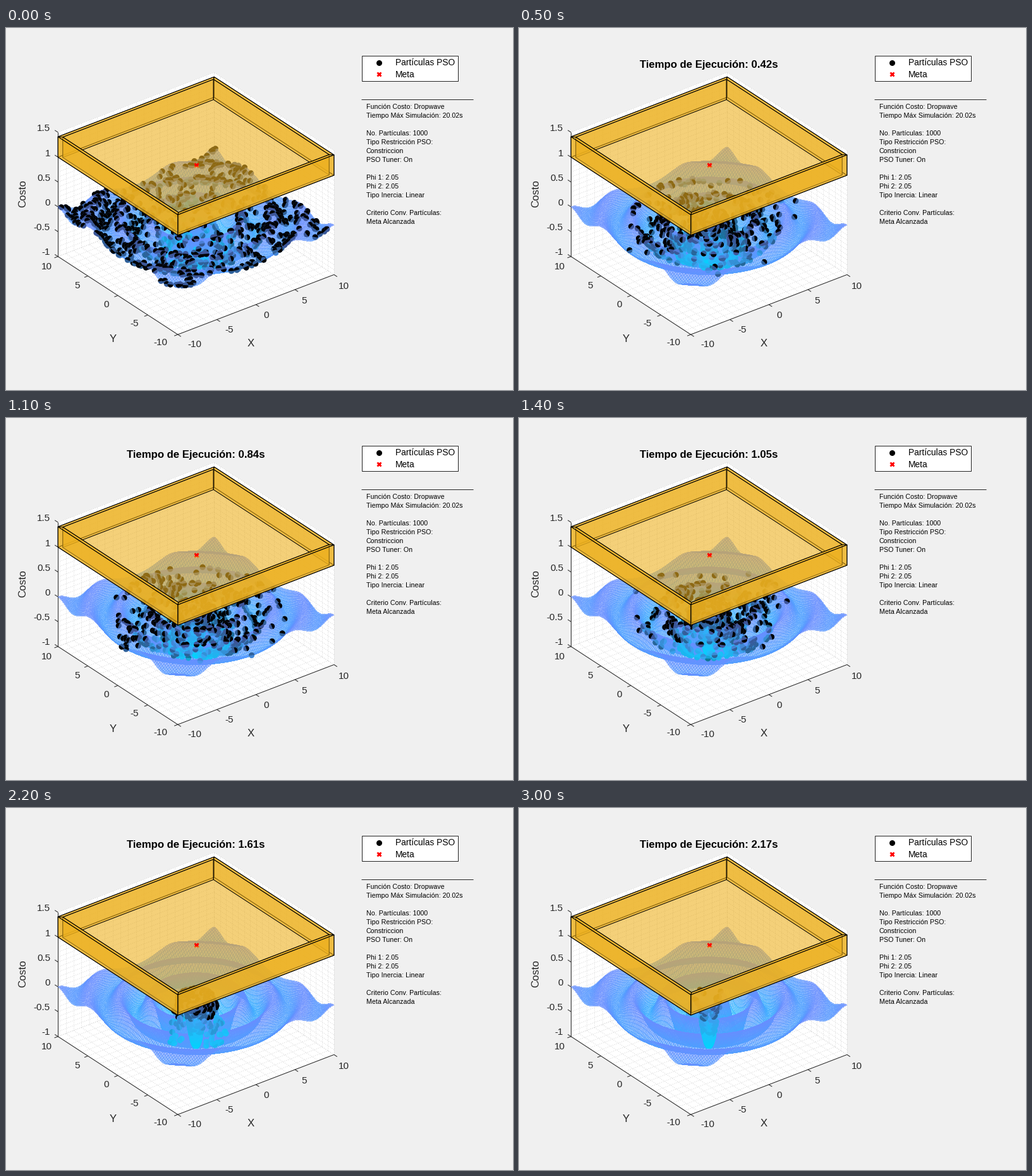
A matplotlib script that plays this animation: 802x573 px, repeating every 3.1 s.

```python
import numpy as np
import matplotlib.pyplot as plt
from matplotlib.animation import FuncAnimation
from matplotlib.collections import LineCollection, PolyCollection
from matplotlib.patches import Polygon, Rectangle

W, H, DPI = 802, 573, 100
FRAMES, STEP_MS = 31, 100
PX = 72 / DPI                       # points per pixel

# Orthographic view: azimuth -37.5, elevation 30
AZ, EL = np.radians(37.5), np.radians(30)
S, SZ = 15.57, 90.8                 # pixels per unit in x/y and in z
RIGHT = np.array([np.cos(AZ), -np.sin(AZ), 0])
UP = np.array([np.sin(EL) * np.sin(AZ), np.sin(EL) * np.cos(AZ), np.cos(EL)])
EYE = np.array([-np.cos(EL) * np.sin(AZ), -np.cos(EL) * np.cos(AZ), np.sin(EL)])
CX, CY = 300.5, 297.4               # screen place of the point (0, 0, 0)

ORANGE = (237 / 255, 177 / 255, 32 / 255, 0.6)
INK = '0.15'
ALPHA = 0.6                         # opacity of the cost surface


def cost(x, y):
    r = np.hypot(x, y)
    return -(1 + np.cos(2 * r)) / (0.068 * r**2 + 2)


def project(x, y, z):
    p = np.stack(np.broadcast_arrays(S * x, S * y, SZ * z), axis=-1)
    return np.stack([CX + p @ RIGHT, CY - p @ UP], axis=-1)


def surface_rgb(z):
    low, high = np.array([0, 215, 255]), np.array([104, 142, 255])
    t = np.clip(1 + np.asarray(z), 0, 1)[..., None]
    return (low + (high - low) * t) / 255


fig = plt.figure(figsize=(W / DPI, H / DPI), dpi=DPI, facecolor='#f0f0f0')
ax = fig.add_axes([0, 0, 1, 1])
ax.set_xlim(0, W)
ax.set_ylim(H, 0)
ax.axis('off')


def label(x, y, s, size, ha='center', color=INK, **kw):
    """Text whose capitals are centred on y."""
    return ax.text(x, y + 0.36 * size, s, fontsize=size * PX, ha=ha,
                   va='baseline', color=color, family='Liberation Sans',
                   zorder=9, **kw)


def lines(segs, color, zorder, style='solid'):
    ax.add_collection(LineCollection(segs, colors=color, linewidths=PX,
                                     linestyles=[style], zorder=zorder))


def draw_axes():
    hull = [(-10, -10, -1), (10, -10, -1), (10, -10, 1.5), (10, 10, 1.5),
            (-10, 10, 1.5), (-10, 10, -1)]
    ax.add_patch(Polygon([project(*p) for p in hull], fc='white', lw=0, zorder=0))

    grid = []
    for u in range(-10, 11):
        grid += [[(u, -10, -1), (u, 10, -1)], [(-10, u, -1), (10, u, -1)],
                 [(u, 10, -1), (u, 10, 1.5)], [(10, u, -1), (10, u, 1.5)]]
    for z in np.linspace(-1, 1.5, 26):
        grid += [[(-10, 10, z), (10, 10, z)], [(10, -10, z), (10, 10, z)]]
    lines([[project(*a), project(*b)] for a, b in grid], '0.84', 1, (0, (1, 2)))

    corner = project(-10, -10, -1)
    left, right = project(-10, 10, -1), project(10, -10, -1)
    axes = [[corner, left], [corner, right], [left, project(-10, 10, 1.5)]]
    for i, v in enumerate(range(-10, 11, 5)):
        a, b = project(v, -10, -1), project(-10, v, -1)
        axes += [[a, a + (5, 3.2)], [b, b + (-5.6, 2.1)]]
        label(298 + 54.2 * i + 1.2 * i * i, 500 - 23 * i, str(v), 15.2)
        label(244 - 40 * i - 1.25 * i * i, 497 - 30 * i, str(v), 15.2)
    for i, v in enumerate(np.arange(-1, 1.6, 0.5)):
        a = project(-10, 10, v)
        axes.append([a, a + (-5, -3.2)])
        label(70, 354 - 39.2 * i, f'{v:g}', 15.2, ha='right')
    lines(axes, INK, 2)

    label(387, 498, 'X', 16.7)
    label(169, 491, 'Y', 16.7)
    ax.text(27, 262, 'Costo', fontsize=16.7 * PX, rotation=90, color=INK,
            ha='center', va='center', family='Liberation Sans', zorder=9)


def draw_surface(cells=96):
    g = np.linspace(-10, 10, cells + 1)
    x, y = np.meshgrid(g, g)
    z = cost(x, y)
    p = project(x, y, z)
    quads = np.stack([p[:-1, :-1], p[:-1, 1:], p[1:, 1:], p[1:, :-1]], axis=2)
    mid = (g[1:] + g[:-1]) / 2
    mx, my = np.meshgrid(mid, mid)
    order = np.argsort((EYE[0] * mx + EYE[1] * my).ravel())
    rgb = surface_rgb(cost(mx, my)).reshape(-1, 3)
    rgba = np.column_stack([rgb, np.full(len(rgb), ALPHA)])
    ax.add_collection(PolyCollection(quads.reshape(-1, 4, 2)[order], linewidths=0,
                                     facecolors=rgba[order], antialiaseds=False,
                                     zorder=3))


def draw_tray(low=1.0, high=1.41, wall=0.35):
    o, i = 10, 10 - wall
    flat = [(-1, -1), (1, -1), (1, 1), (-1, 1)]

    def side(a, b, r):
        return [(a[0] * r, a[1] * r, low), (b[0] * r, b[1] * r, low),
                (b[0] * r, b[1] * r, high), (a[0] * r, a[1] * r, high)]

    def rim(a, b):
        return [(a[0] * o, a[1] * o, high), (b[0] * o, b[1] * o, high),
                (b[0] * i, b[1] * i, high), (a[0] * i, a[1] * i, high)]

    front, right, back, left = flat
    far = [(left, back), (right, back)]
    near = [(front, left), (front, right)]
    faces = [[(a * o, b * o, low) for a, b in flat]]
    faces += [side(a, b, o) for a, b in far] + [side(a, b, i) for a, b in far]
    faces += [side(a, b, i) for a, b in near]
    faces += [rim(a, b) for a, b in far + near]
    faces += [side(a, b, o) for a, b in near]
    for f in faces:
        ax.add_patch(Polygon([project(*p) for p in f], fc=ORANGE, ec='black',
                             lw=PX, joinstyle='round', zorder=6))


def cross(x, y, zorder):
    return ax.plot([x], [y], 'x', color='red', ms=6.4 * PX, mew=2.8 * PX,
                   zorder=zorder)[0]


def draw_goal():
    # The lower half of the mark lies behind the tray's floor.
    cross(300.5, 217, 5)
    top = cross(300.5, 217, 7)
    top.set_clip_path(Rectangle((290, 205), 21, 12.5, transform=ax.transData))


def draw_panel():
    ax.add_patch(Rectangle((562.5, 43.5), 152, 40, fc='white', ec=INK, lw=PX,
                           zorder=8))
    ax.plot([589.5], [54.5], 'o', color='black', ms=9 * PX, mew=0, zorder=9)
    cross(589.5, 73, 9)
    label(616, 54.5, 'Partículas PSO', 13.75, ha='left', color='black')
    label(616, 73.5, 'Meta', 13.75, ha='left', color='black')

    lines([[(562, 112.5), (739, 112.5)]], INK, 8)
    info = ['Función Costo: Dropwave', 'Tiempo Máx Simulación: 20.02s', '',
            'No. Partículas: 1000', 'Tipo Restricción PSO:', 'Constriccion',
            'PSO Tuner: On', '', 'Phi 1: 2.05', 'Phi 2: 2.05',
            'Tipo Inercia: Linear', '', 'Criterio Conv. Partículas:',
            'Meta Alcanzada']
    for i, s in enumerate(info):
        label(570, 124.5 + 14 * i, s, 10.67, ha='left', color='black')


def swarm_path(count=1000, chi=0.7298, phi=2.05):
    """Constricted swarm around the best point, held to the wanted spread."""
    rng = np.random.default_rng(12)
    x = rng.uniform(-10, 10, (count, 2))
    v, best = np.zeros_like(x), x.copy()
    keys = [0, 5, 9, 14, 18, 22, 30]
    spread = [5, 2.7, 3.5, 2.1, 1.2, 0.62, 0.14]
    reach = [10, 10.5, 10.8, 9, 6, 3.4, 1.8]
    path = [x]
    for n in range(1, FRAMES):
        r1, r2 = rng.random((2, count, 2))
        v = chi * (v + phi * r1 * (best - x) - phi * r2 * x)
        x = x + v
        better = cost(*x.T) < cost(*best.T)
        best = np.where(better[:, None], x, best)
        q = x * np.interp(n, keys, spread) / np.abs(x).mean()
        r = np.hypot(*q.T)[:, None]
        limit = np.interp(n, keys, reach)
        path.append(np.clip(q / np.sqrt(1 + (r / limit)**2), -10, 10))
    return path


def layers_before(x, y, z):
    """Number of surface sheets between each point and the eye."""
    t = np.arange(8, 200, 4)
    qx, qy = x[:, None] + t * EYE[0] / S, y[:, None] + t * EYE[1] / S
    gap = z[:, None] + t * EYE[2] / SZ - cost(qx, qy)
    inside = (np.abs(qx) <= 10) & (np.abs(qy) <= 10)
    return ((gap[:, 1:] * gap[:, :-1] < 0) & inside[:, 1:]).sum(axis=1)


def dots(pos, radius=4.6, e=0.01):
    """Discs cut by the surface: the half behind it takes its tint."""
    x, y = pos.T
    z = cost(x, y)
    depth = S * x * EYE[0] + S * y * EYE[1] + SZ * z * EYE[2]
    order = np.argsort(depth)
    x, y, z = x[order], y[order], z[order]
    k = SZ / S / (2 * e)
    normal = np.stack([k * (cost(x - e, y) - cost(x + e, y)),
                       k * (cost(x, y - e) - cost(x, y + e)),
                       np.ones_like(x)], axis=-1)
    facing = np.where(normal @ EYE >= 0, 1, -1)
    angle = np.arctan2(facing * (normal @ UP), facing * (normal @ RIGHT))

    n = 16
    full = np.tile(np.arange(n) * 2 * np.pi / n, (len(x), 1))
    half = angle[:, None] + np.linspace(-np.pi / 2, np.pi / 2, n)
    a = np.stack([full, half], axis=1)
    ring = radius * np.stack([np.cos(a), -np.sin(a)], axis=-1)
    verts = project(x, y, z)[:, None, None, :] + ring

    sheets = layers_before(x, y, z)
    cover = 1 - (1 - ALPHA)**np.stack([sheets + 1, sheets], axis=1)
    rgb = surface_rgb(z)[:, None, :] * cover[..., None]
    return verts.reshape(-1, n, 2), rgb.reshape(-1, 3)


draw_axes()
draw_surface()
draw_tray()
draw_goal()
draw_panel()
title = label(300.5, 56.5, '', 16.7, color='black', weight='bold')
poses = [dots(p) for p in swarm_path()]
swarm = PolyCollection(poses[0][0], facecolors=poses[0][1], linewidths=0, zorder=4)
ax.add_collection(swarm)


def update(n):
    verts, rgb = poses[n]
    swarm.set_verts(verts)
    swarm.set_facecolor(rgb)
    title.set_text(f'Tiempo de Ejecución: {0.07 * (n + 1):.2f}s' if n else '')
    return swarm, title


anim = FuncAnimation(fig, update, frames=FRAMES, interval=STEP_MS, repeat=True,
                     repeat_delay=0, blit=False)
plt.show()
```
